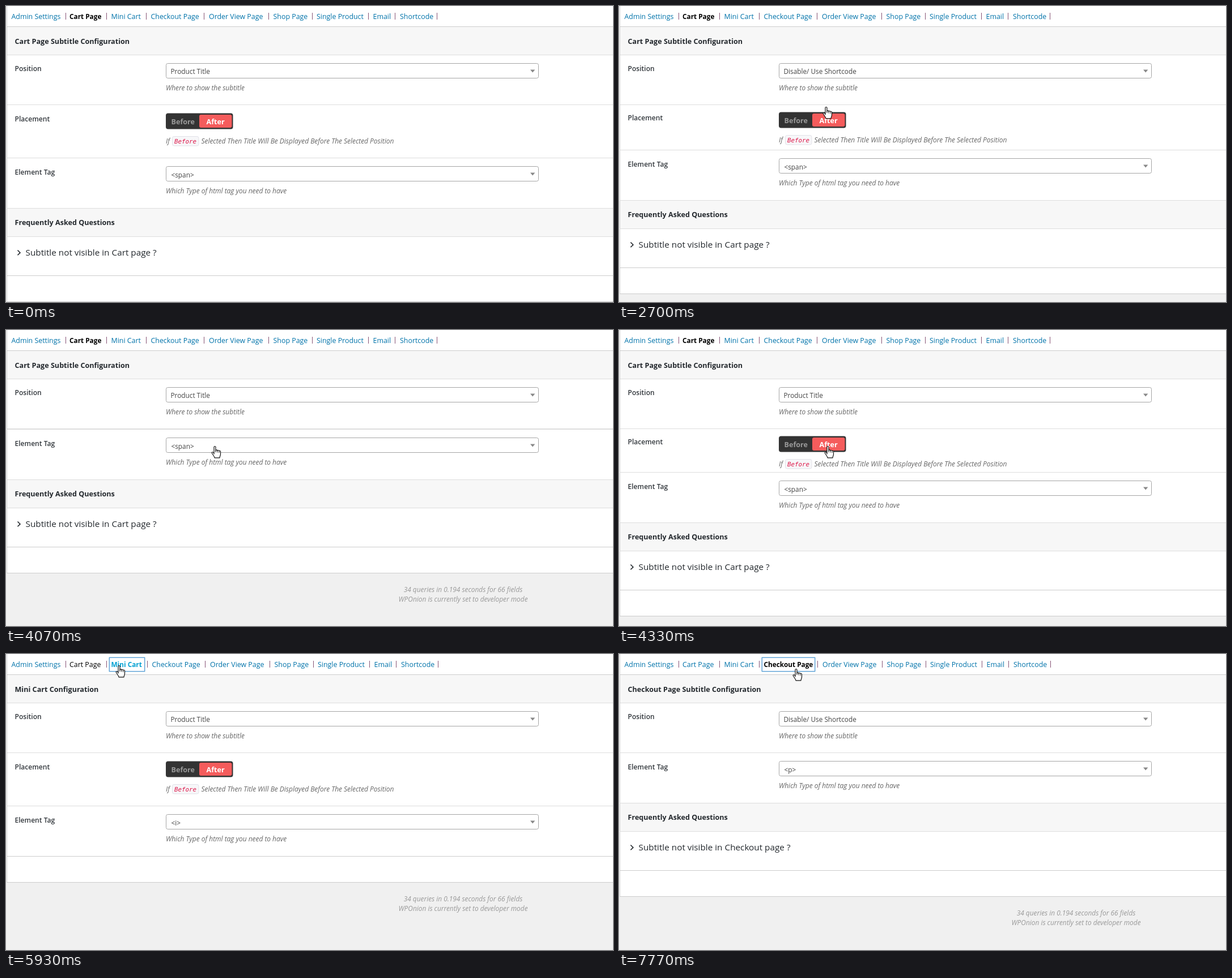
Animation, 1071 px wide and 523 px high, one loop 8 s. Source, as an HTML page:

```html
<!DOCTYPE html>
<html lang="en">
<head>
<meta charset="utf-8">
<title>Subtitle settings</title>
<style>
html, body { margin: 0; width: 100%; height: 100%; overflow: hidden; background: #fff; }
svg { display: block; width: 1071px; height: 523px; font-family: "Open Sans", "Noto Sans", sans-serif; }
text { white-space: pre; }
.tab { font-size: 12.4px; }
.tab.active { font-size: 11.8px; font-weight: 700; }
.head { font-size: 12.6px; font-weight: 700; fill: #23282d; }
.label { font-size: 12.1px; font-weight: 600; fill: #32373c; }
.value { font-size: 11.8px; fill: #444; }
.note { font-size: 11.97px; font-style: italic; fill: #666; }
.faq { font-size: 15.3px; fill: #23282d; }
.switch { font-size: 12.6px; font-weight: 700; }
.code { font: italic 10.8px "DejaVu Sans Mono", monospace; fill: #dd1144; }
.foot { font-size: 11.9px; font-style: italic; fill: #999; text-anchor: middle; }
.select { fill: #fff; stroke: #a5a5a5; }
</style>
</head>
<body>
<svg id="stage" viewBox="0 0 1071 523"></svg>
<script>
const LOOP = 8000;
const LINK = [0, 115, 170], HOVER = [0, 160, 210], BLACK = [0, 0, 0];

const TABS = [
  ['Admin Settings', 9.5, 105], ['Cart Page', 112, 177], ['Mini Cart', 185.5, 247],
  ['Checkout Page', 255.5, 349], ['Order View Page', 358, 463], ['Shop Page', 471.5, 540],
  ['Single Product', 548, 639], ['Email', 647.5, 686], ['Shortcode', 695, 760]
];

const PAGES = {
  1: { from: 0, title: 'Cart Page Subtitle Configuration', tag: '<span>', name: 'Cart' },
  2: { from: 5930, title: 'Mini Cart Configuration', tag: '<i>', shift: 2, ring: [182.5, 62] },
  3: { from: 7630, title: 'Checkout Page Subtitle Configuration', tag: '<p>', name: 'Checkout', shift: 1, ring: [252.5, 93] }
};

// time, tip x, tip y, hand (1) or arrow (0)
const TRACK = [
  [770, 384, 409, 0], [900, 384, 222, 0], [1130, 384, 222, 0], [1270, 350, 100, 1],
  [1570, 350, 100, 1], [1700, 350, 106, 1], [2060, 350, 106, 1], [2230, 365, 178, 1],
  [2370, 365, 178, 1], [2400, 366, 182, 1], [2660, 366, 182, 1], [2900, 368, 126, 1],
  [3170, 368, 126, 1], [3260, 368, 113, 1], [3500, 368, 113, 1], [3800, 369, 205, 1],
  [4480, 369, 205, 1], [4870, 384, 269, 0], [5370, 225, 44, 0], [5530, 225, 44, 0],
  [5770, 200, 20, 1], [6000, 200, 20, 1], [6680, 340, 44, 0], [6970, 340, 44, 0],
  [7230, 313, 26, 1]
];

const clamp = v => Math.max(0, Math.min(1, v));
const swing = v => 0.5 - Math.cos(Math.PI * clamp(v)) / 2;
const mix = (a, b, k) => a + (b - a) * k;
const rgb = (a, b, k) => `rgb(${a.map((v, i) => Math.round(mix(v, b[i], k)))})`;
const esc = s => s.replace(/</g, '&lt;').replace(/>/g, '&gt;');

const text = (cls, x, y, s, extra = '') => `<text class="${cls}" x="${x}" y="${y}" ${extra}>${esc(s)}</text>`;
const rect = (x, y, w, h, extra) => `<rect x="${x}" y="${y}" width="${w}" height="${h}" ${extra}/>`;
const rule = (y, color = '#ddd') => `<path d="M1 ${y}.5H1071" stroke="${color}"/>`;
const select = (y, id, dx = 0, dy = 0) => rect(282.5, y + 0.5, 657, 26, 'rx="3" class="select"') +
  text('value', 290.5 + dx, y + 19 + dy, '', `id="${id}"`) +
  `<path id="${id}Arrow" d="M925 ${y + 11.5}h8.4l-4.2 5z" fill="#888"/>`;

const stage = document.getElementById('stage');
stage.innerHTML = `
  <clipPath id="slot"><rect id="slotBox" x="0" y="175" width="1071" height="93"/></clipPath>
  ${rect(0, 0, 1071, 523, 'fill="#fff"')}
  ${rect(1, 37, 1070, 49, 'fill="#f7f7f7"')}
  ${TABS.map((t, i) => `<g id="tab${i}">${text('tab', t[1], 23.3, t[0])}${rect(t[2], 12, 1, 12, 'fill="#875476"')}</g>`).join('')}
  <rect id="glow" y="5.5" height="26" rx="1" fill="none" stroke="#1e8cbe" stroke-opacity=".3"/>
  <rect id="ring" y="6.5" height="24" fill="none" stroke="#5b9dd9"/>
  ${rule(36, '#ccc')}${rule(86)}
  ${text('head', 15.5, 66.5, '', 'id="title"')}
  ${text('label', 15.5, 114.8, 'Position')}
  ${select(101, 'pos')}
  ${text('note', 282, 149, 'Where to show the subtitle')}
  ${rule(174)}
  <g clip-path="url(#slot)"><g id="placement">
    ${text('label', 15.5, 203.8, 'Placement')}
    ${rect(282, 189.5, 118.5, 28, 'rx="4" fill="#333"')}
    ${rect(341, 192, 57.5, 23, 'rx="3" fill="#f55c5c"')}
    ${text('switch', 291.5, 209, 'Before', 'fill="#999"')}
    ${text('switch', 353.5, 209, 'After', 'fill="#fff"')}
    ${text('note', 282, 243, 'If')}
    ${rect(293.5, 230.5, 46.5, 16.5, 'rx="3" fill="#f7f7f9" stroke="#e1e1e8"')}
    ${text('code', 297, 243, 'Before')}
    ${text('note', 344.5, 243, 'Selected Then Title Will Be Displayed Before The Selected Position')}
  </g></g>
  <path d="M1.5 0V523" stroke="#ccc"/>
  <g id="lower">
    ${rule(268)}
    ${text('label', 15.5, 297.8, 'Element Tag')}
    ${select(283, 'tag', 1, 1)}
    ${text('note', 282, 331, 'Which Type of html tag you need to have')}
    <g id="faq">
      ${rect(2, 358, 1069, 49, 'fill="#f7f7f7"')}${rule(357)}${rule(407)}
      ${text('head', 15.5, 387, 'Frequently Asked Questions')}
      <path d="M20.5 431.5l4.5 4.4-4.5 4.4" fill="none" stroke="#23282d" stroke-width="1.6"/>
      ${text('faq', 34.5, 441.2, '', 'id="question"')}
    </g>
    <g id="end">
      ${rule(476, '#ccc')}
      ${rect(0, 523, 1071, 400, 'fill="#f0f0f0"')}${rule(522, '#ccc')}
      ${text('foot', 806.5, 556, '34 queries in 0.194 seconds for 66 fields')}
      ${text('foot', 806.5, 573.2, 'WPOnion is currently set to developer mode')}
    </g>
  </g>
  <g id="menu">
    <path d="M282.5 127.5H939.5V229a3 3 0 0 1-3 3H285.500a-3 3 0 0 1-3-3z" class="select"/>
    ${rect(287.5, 131.5, 649, 28.5, 'fill="none" stroke="#cfe6ee"')}
    ${rect(288.5, 132.5, 647, 26.5, 'fill="#fff" stroke="#8199a3"')}
    <path id="caret" d="M293.5 137V155" stroke="#222"/>
    <rect id="row0" x="283" y="164" width="656" height="28"/>
    <rect id="row1" x="283" y="198" width="656" height="28"/>
    ${text('value', 288.5, 183, 'Disable/ Use Shortcode', 'id="opt0"')}
    ${text('value', 288.5, 216.5, 'Product Title', 'id="opt1"')}
  </g>
  <g id="cursor" fill="#fff" stroke="#111" stroke-linejoin="round">
    <path id="arrow" d="M.5 .5V16l3.7-3.4 2.5 5.7 2.4-1-2.5-5.6h5z"/>
    <g id="hand">
      <path d="M-2 14V2a1.5 1.5 0 0 1 3 0v6c0-1.6 3-1.4 3 .4c0-1.4 3-1.2 3 .6c0-1.2 2.5-1 2.5 .8v5c0 2-1.5 3.5-1.5 6h-9c0-2-2-4-4.5-8c-1.2-2.5 1.5-3 3.5 0z" stroke-width="1.2"/>
      <path d="M1 8v3M4 8.5v3M7 9.5v2.5" fill="none"/>
    </g>
  </g>`;

const el = {};
stage.querySelectorAll('[id]').forEach(n => el[n.id] = n);
const show = (n, on) => n.setAttribute('visibility', on ? 'visible' : 'hidden');
const move = (n, x, y) => n.setAttribute('transform', `translate(${x} ${y})`);
const say = (n, s) => { if (n.textContent !== s) n.textContent = s; };

function cursorAt(t) {
  const i = TRACK.findIndex(k => k[0] > t);
  if (i === 0) return null;
  if (i < 0) return TRACK[TRACK.length - 1].slice(1);
  const a = TRACK[i - 1], b = TRACK[i];
  const k = (t - a[0]) / (b[0] - a[0]), e = swing(k);
  return [mix(a[1], b[1], e), mix(a[2], b[2], e), k < 0.5 ? a[3] : b[3]];
}

function drawTabs(t, active, cursor) {
  const page = PAGES[active], fade = clamp((t - page.from - 30) / 50);
  const dx = page.shift || 0;
  TABS.forEach(([, x, sep], i) => {
    const [label, bar] = el['tab' + i].children, current = i === active;
    const over = cursor && cursor[1] > 8 && cursor[1] < 32 && cursor[0] > x && cursor[0] < sep - 5;
    let color = rgb(over ? HOVER : LINK, BLACK, 0);
    if (current) color = active === 1 ? '#000' : rgb(HOVER, BLACK, fade);
    else if (active > 1 && i === active - 1) color = rgb(BLACK, LINK, fade);
    label.setAttribute('fill', color);
    label.classList.toggle('active', current);
    move(el['tab' + i], i > active ? dx : 0, 0);
    move(bar, current ? dx : 0, 0);
  });
  for (const [n, pad] of [[el.ring, 0], [el.glow, 1]]) {
    show(n, page.ring);
    if (page.ring) {
      n.setAttribute('x', page.ring[0] - pad);
      n.setAttribute('width', page.ring[1] + 2 * pad);
    }
  }
}

function drawMenu(t, cursor) {
  const first = t >= 1800 && t < 2600, second = t >= 3270 && t < 4070;
  const open = first || second;
  show(el.menu, open);
  show(el.caret, open && t - (first ? 1800 : 3270) < 560);
  el.posArrow.setAttribute('d', open ? 'M925 117.5h8.4l-4.2-5z' : 'M925 112.5h8.4l-4.2 5z');
  if (!open) return;
  const chosen = first ? 1 : 0, y = cursor[1];
  const lit = y > 195 ? 1 : y > 162 ? 0 : chosen;
  [0, 1].forEach(i => {
    el['row' + i].setAttribute('fill', i === lit ? '#5897fb' : i === chosen ? '#ddd' : '#fff');
    el['opt' + i].style.fill = i === lit ? '#fff' : '#444';
  });
}

function draw(t) {
  const active = t < PAGES[2].from ? 1 : t < PAGES[3].from ? 2 : 3;
  const page = PAGES[active], cursor = cursorAt(t);
  const disabled = active === 3 || (t >= 2600 && t < 4070);

  // how far the placement row is unfolded
  let p = 0;
  if (active < 3) p = t < 4042 ? 1 - swing((t - 2600) / 400) : swing((t - 4042) / 400);
  const h = Math.round(94 * p);

  say(el.title, page.title);
  say(el.pos, disabled ? 'Disable/ Use Shortcode' : 'Product Title');
  say(el.tag, page.tag);
  say(el.question, `Subtitle not visible in ${page.name} page ?`);

  el.slotBox.setAttribute('height', Math.max(0, h - 1));
  move(el.placement, 0, Math.round(-14 * (1 - p)));
  move(el.lower, 0, h - 94);
  show(el.faq, page.name);
  move(el.end, 0, page.name ? 0 : -119);

  drawTabs(t, active, cursor);
  drawMenu(t, cursor);

  show(el.cursor, cursor);
  if (cursor) {
    move(el.cursor, Math.round(cursor[0]), Math.round(cursor[1]));
    el.hand.style.display = cursor[2] ? '' : 'none';
    el.arrow.style.display = cursor[2] ? 'none' : '';
  }
}

const start = performance.now();
function tick() {
  // the row must stay shut until the menu closes
  const t = (performance.now() - start) % LOOP;
  draw(t);
  requestAnimationFrame(tick);
}
tick();
</script>
</body>
</html>
```
